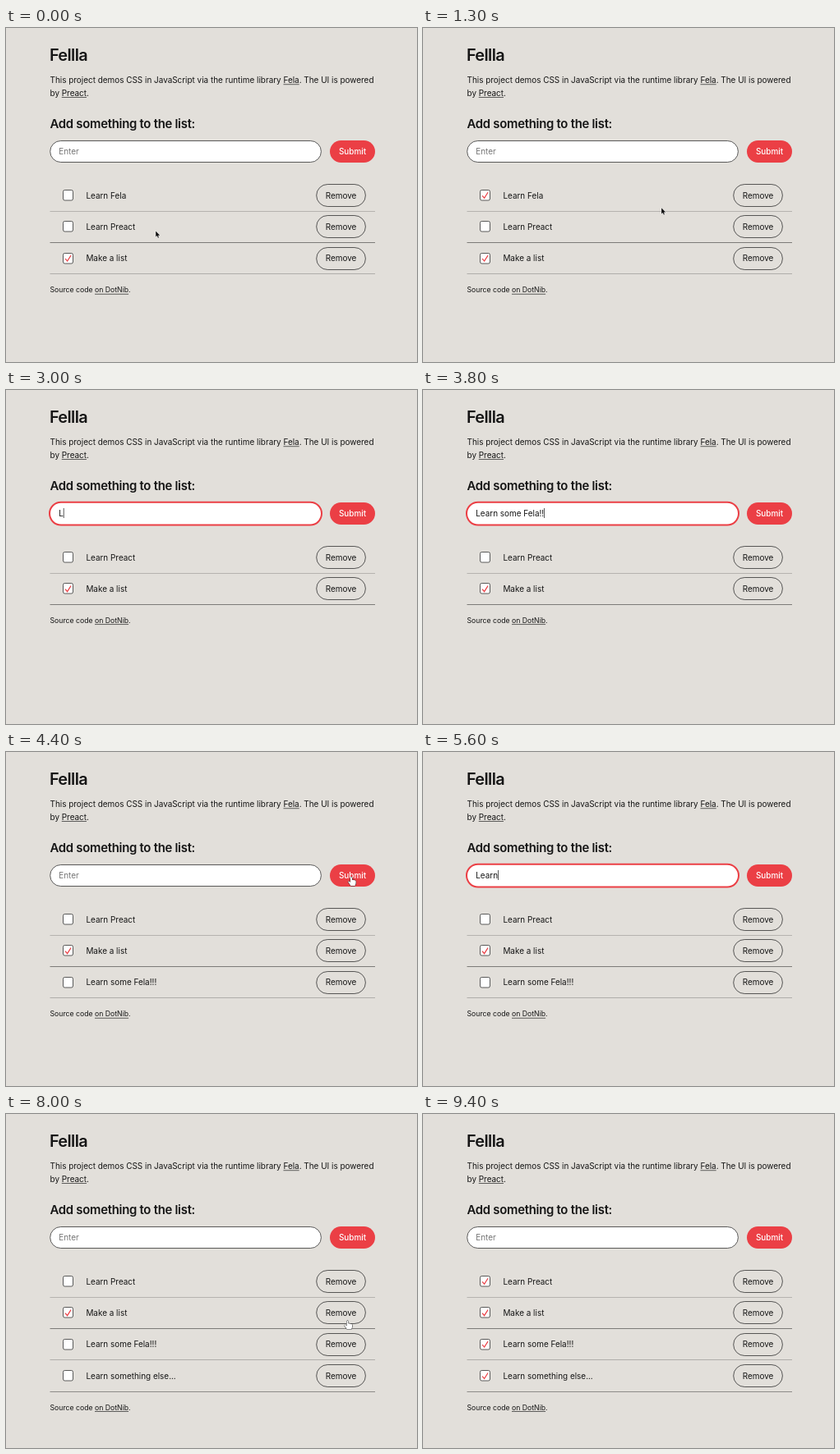
Animation of 500 by 407 pixels, one loop 10000 ms. Source, as an HTML page with a canvas:

```html
<!DOCTYPE html>
<html lang="en">
<head>
<meta charset="utf-8">
<title>Todo list demo</title>
<style>
  html, body { margin: 0; width: 100%; height: 100%; overflow: hidden; background: #e2dfda; }
  canvas { display: block; width: 500px; height: 407px; }
</style>
</head>
<body>
<canvas id="stage"></canvas>
<script>
const W = 500, H = 407, LOOP = 10000, STEP = 100;
const EM = 9.94, LEFT = 53.5, RIGHT = 449;
const ROW_TOP = 204, ROW_H = 38.45;
const INK = '#151515', EDGE = '#333', RED = '#eb3f45', PAPER = '#e2dfda';
const LINE_INK = ['#b5b3af', '#7d7b78', '#b0aeaa', '#8d8b88'];

const canvas = document.getElementById('stage');
const ctx = canvas.getContext('2d');
const dpr = window.devicePixelRatio || 1;
canvas.width = W * dpr;
canvas.height = H * dpr;

// Times in ms: when an item exists and when it gets ticked.
const items = [
  { label: 'Learn Fela', from: 0, to: 1800, done: 900 },
  { label: 'Learn Preact', from: 0, to: LOOP, done: 8400 },
  { label: 'Make a list', from: 0, to: LOOP, done: 0 },
  { label: 'Learn some Fela!!!', from: 4300, to: LOOP, done: 8700 },
  { label: 'Learn something else...', from: 7600, to: LOOP, done: 9000 }
];

const entries = [
  { text: 'Learn some Fela!!!', focus: 2700, start: 2900, perChar: 52, submit: 4300 },
  { text: 'Learn something else...', focus: 5000, start: 5100, perChar: 93, submit: 7600 }
];

// Pointer waypoints: time, x, y.
const route = [
  [0, 182.2, 247.4], [400, 182.2, 247.4], [800, 75, 205], [1000, 75, 205],
  [1500, 407, 227], [1600, 390, 209], [2200, 390, 209], [2500, 151.5, 148],
  [4000, 151.5, 148], [4200, 420, 152], [4700, 420, 152], [5000, 151.5, 148],
  [7300, 151.5, 148], [7500, 420, 152], [7900, 420, 152], [8000, 415.5, 251.5],
  [8300, 75, 205], [8400, 75, 205], [8600, 75, 282], [8700, 75, 282],
  [8900, 75, 320], [9000, 75, 320], [9300, 270, 325], [LOOP, 270, 325]
];
const hidden = [[2900, 4000], [5200, 7300], [9400, LOOP]];

const within = (t, [a, b]) => t >= a && t < b;
const inBox = (x, y, l, t, r, b) => x >= l && x <= r && y >= t && y <= b;

function setFont(size, weight = 400, spacing = 0) {
  ctx.font = `${weight} ${size}px Inter, "Liberation Sans", sans-serif`;
  ctx.letterSpacing = `${spacing * size}px`;
}

function write(str, x, y, color = INK) {
  ctx.fillStyle = color;
  ctx.fillText(str, x, y);
  return x + ctx.measureText(str).width;
}

// Parts starting with "_" are links.
function writeLinks(parts, x, y) {
  for (const part of parts) {
    const link = part[0] === '_';
    const end = write(link ? part.slice(1) : part, x, y);
    if (link) ctx.fillRect(x, y + 1.4, end - x, 0.65);
    x = end;
  }
}

function box(x, y, w, h, r, fill, stroke, width = 0.8) {
  ctx.beginPath();
  ctx.roundRect(x, y, w, h, r);
  if (fill) { ctx.fillStyle = fill; ctx.fill(); }
  if (stroke) { ctx.strokeStyle = stroke; ctx.lineWidth = width; ctx.stroke(); }
}

function centered(str, x, y, color) {
  ctx.textAlign = 'center';
  write(str, x, y, color);
  ctx.textAlign = 'left';
}

function drawHeader() {
  setFont(EM * 2, 600, -0.03);
  write('Fellla', LEFT - 0.6, 40.3);
  setFont(EM);
  writeLinks(['This project demos CSS in JavaScript via the runtime library ', '_Fela',
    '. The UI is powered'], LEFT, 67.1);
  writeLinks(['by ', '_Preact', '.'], LEFT, 82.7);
  setFont(EM * 1.5, 600, -0.019);
  write('Add something to the list:', LEFT, 122.3);
}

function drawForm(t) {
  const entry = entries.find(e => within(t, [e.focus, e.submit]));
  if (entry) box(53, 136.7, 331, 27.8, 13.9, '#fff', RED, 2);
  else box(53.7, 137.5, 329.7, 26, 13, '#fff', EDGE);

  setFont(EM);
  const count = entry ? Math.max(0, Math.floor((t - entry.start) / entry.perChar)) : 0;
  const typed = entry ? entry.text.slice(0, count) : '';
  const x = 64.2, y = 154.1;
  if (!typed) write('Enter', x, y, '#757575');
  if (entry) {
    const end = write(typed, x, y);
    ctx.fillRect(end, 144, 0.7, 12);
  }
  box(394, 137, 55, 27, 13.5, RED);
  setFont(EM, 500);
  centered('Submit', 421.5, y, '#fff');
}

function drawRow(item, i, t) {
  const y = ROW_TOP + i * ROW_H, mid = Math.round(y);
  box(69.5, mid - 6.5, 12, 12.5, 2, '#fff', EDGE);
  if (t >= item.done) {
    ctx.beginPath();
    ctx.moveTo(72.2, y + 0.3);
    ctx.lineTo(74.6, y + 3.2);
    ctx.lineTo(79, y - 3.8);
    ctx.strokeStyle = RED;
    ctx.lineWidth = 1.2;
    ctx.stroke();
  }
  setFont(EM);
  write(item.label, 97.4, y + 3.5);
  box(377.7, mid - 13.5, 59.7, 27, 13.5, null, EDGE);
  centered('Remove', 407.5, y + 3.5, INK);
  ctx.fillStyle = LINE_INK[i];
  ctx.fillRect(LEFT, Math.round(y + 18.5), RIGHT - LEFT, 1);
}

function drawFooter(count) {
  setFont(EM * 0.875);
  writeLinks(['Source code ', '_on DotNib', '.'], LEFT, 207.1 + count * ROW_H);
}

function pointerAt(t) {
  const next = Math.max(1, route.findIndex(p => p[0] > t));
  const [t0, x0, y0] = route[next - 1], [t1, x1, y1] = route[next];
  const u = (t - t0) / (t1 - t0), k = u * u * (3 - 2 * u);
  return [x0 + (x1 - x0) * k, y0 + (y1 - y0) * k];
}

function pointerShape(x, y, rows) {
  if (inBox(x, y, 54, 137, 383, 164)) return beam;
  if (inBox(x, y, 394, 137, 449, 164)) return hand;
  const overRow = rows.some((_, i) => {
    const c = ROW_TOP + i * ROW_H;
    return inBox(x, y, 69, c - 6, 82, c + 6) || inBox(x, y, 377, c - 14, 438, c + 14);
  });
  return overRow ? hand : arrow;
}

function outline(path, fill, stroke, width) {
  const shape = new Path2D(path);
  ctx.lineWidth = width;
  ctx.lineJoin = 'round';
  ctx.strokeStyle = stroke;
  ctx.fillStyle = fill;
  ctx.stroke(shape);
  ctx.fill(shape);
}

const arrow = () => outline('M0 0V7.2L1.6 5.7L2.7 8.3L3.8 7.9L2.7 5.3H5Z', '#111', '#fff', 0.8);
const beam = () => outline('M-1.8-4.6Q0-4.6 0-3.6Q0-4.6 1.8-4.6M0-3.6V3.6M-1.8 4.6Q0 4.6 0 3.6Q0 4.6 1.8 4.6',
  'transparent', '#333', 0.9);
const hand = () => outline('M-1 .8Q0-.4 1 .8V4Q2 3.2 2.8 4.2Q3.8 3.6 4.4 4.6Q5.6 4.4 5.6 5.6V8L4.6 11H-.6' +
  'L-3.6 6.6Q-3.4 5.2-2.2 5.8L-1 7Z', '#fff', '#222', 1);

function drawPointer(t, rows) {
  if (hidden.some(span => within(t, span))) return;
  const [x, y] = pointerAt(t);
  ctx.save();
  ctx.translate(x, y);
  pointerShape(x, y, rows)();
  ctx.restore();
}

function render(t) {
  const rows = items.filter(item => within(t, [item.from, item.to]));
  ctx.setTransform(dpr, 0, 0, dpr, 0, 0);
  ctx.fillStyle = PAPER;
  ctx.fillRect(0, 0, W, H);
  drawHeader();
  drawForm(t);
  rows.forEach((item, i) => drawRow(item, i, t));
  drawFooter(rows.length);
  drawPointer(t, rows);
}

// The picture advances ten times a second.
const began = performance.now();
function tick() {
  const t = (performance.now() - began) % LOOP;
  render(Math.floor(t / STEP) * STEP);
  requestAnimationFrame(tick);
}
tick();
</script>
</body>
</html>
```
